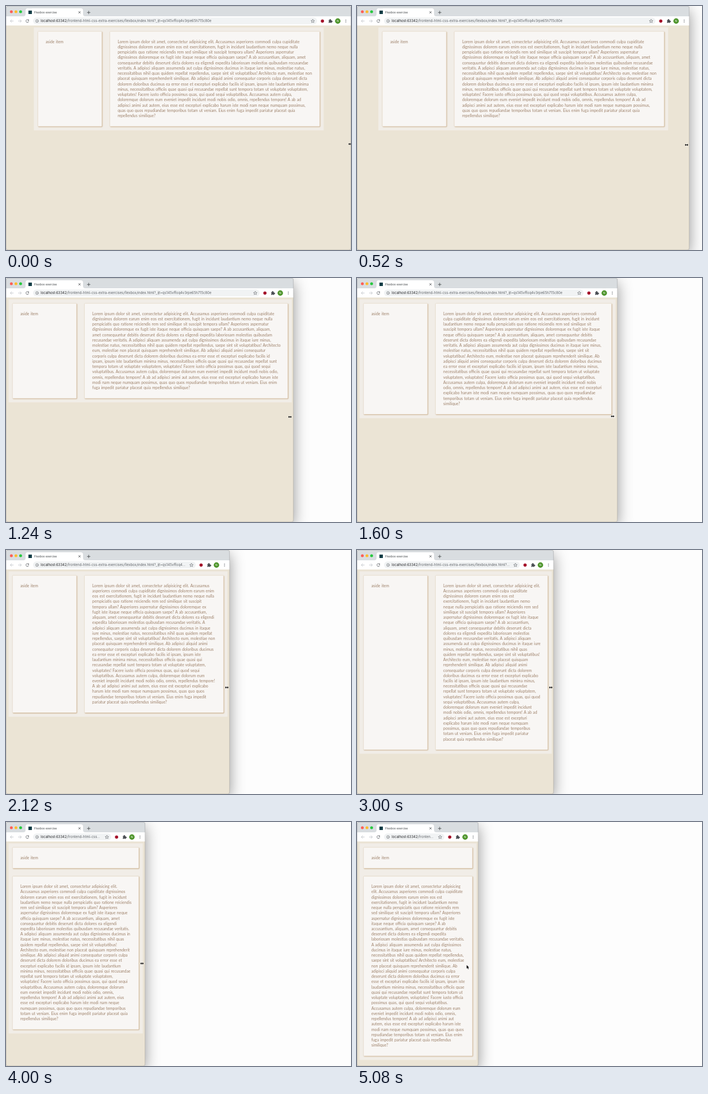
An HTML page for the animation above (5280 ms loop, 600 px wide and 426 px high).

```html
<!DOCTYPE html>
<html lang="en">
<head>
<meta charset="utf-8">
<title>Flexbox exercise</title>
<style>
  html, body { margin: 0; width: 100%; height: 100%; overflow: hidden; background: #fdfdfd; }
  #stage { position: relative; width: 600px; height: 426px; overflow: hidden; background: #fdfdfd; }
  #stage svg { position: absolute; display: block; overflow: visible; }
  #window {
    position: absolute; left: 0; top: 0; height: 426px; border-radius: 4px;
    box-shadow: 0 8px 26px rgba(0, 0, 0, .42), 0 0 1px rgba(0, 0, 0, .3);
  }
  #frame { position: absolute; inset: 0; overflow: hidden; border-radius: 4px; background: #ebe4d5; }
  #edge { position: absolute; inset: 0; border-radius: 4px; box-shadow: inset 0 0 0 .6px rgba(90, 90, 90, .35); }
  #tabs { position: absolute; left: 0; right: 0; top: 0; height: 18px; background: #d9dde0; }
  #bar { position: absolute; left: 0; right: 0; top: 18px; height: 16px; background: #fff; }
  #pill { position: absolute; left: 47px; right: 59px; top: 20.4px; height: 11.4px; border-radius: 6px; background: #f1f3f4; }
  .ui { position: absolute; font-family: Inter, Roboto, sans-serif; white-space: nowrap; overflow: hidden; }
  #title { left: 49px; top: 7px; font-size: 5px; line-height: 8px; color: #3c4043; }
  #url { left: 60.3px; right: 76px; top: 21px; font-size: 5.9px; line-height: 10px; color: #5f6368; text-overflow: ellipsis; }
  #url b { font-weight: 400; color: #202124; }

  /* The page is laid out in its own CSS pixels and shown at 42 %. */
  #page {
    position: absolute; left: .6px; top: 34px; transform: scale(.42); transform-origin: 0 0;
    font: 16.2px/22px Lato, "Open Sans", sans-serif; word-spacing: 1.25px; color: #9d8069;
  }
  #container { box-sizing: border-box; max-width: 1200px; margin: 8px auto; padding: 16px; background: #f1ede7; display: flex; gap: 32px; }
  .stacked #container { flex-direction: column; }
  .card {
    box-sizing: border-box; padding: 32px; background: #f8f6f4;
    border: 1px solid #dccbb3; border-radius: 3px; box-shadow: 2px 2px 4px #cab08e;
  }
  .card p { margin: 0; position: relative; top: -1.3px; white-space: pre; }
  #aside { flex: none; width: 266px; }
  #main { flex: 1; min-width: 0; }
  .stacked #aside, .stacked #main { flex: none; width: 100%; }
</style>
</head>
<body>
<div id="stage">
  <div id="window">
    <div id="frame">
      <div id="tabs"></div>
      <div id="bar"></div>
      <div id="pill"></div>
      <svg width="200" height="34" fill="none" stroke-linecap="round">
        <circle cx="9.3" cy="10" r="2.5" fill="#fe5f57"/>
        <circle cx="17.3" cy="10" r="2.5" fill="#febc2e"/>
        <circle cx="25.4" cy="10" r="2.5" fill="#28c840"/>
        <path d="M30 18q4 0 4-4V8q0-4 4-4H130q4 0 4 4v6q0 4 4 4Z" fill="#fff"/>
        <rect x="39" y="8" width="6" height="6" fill="#123d46"/>
        <path d="M126.3 9.6l3 3m0-3l-3 3M141.3 11.3h5m-2.5-2.5v5" stroke="#3c4043" stroke-width=".8"/>
        <path d="M12.8 26.2H7.6m2.3-2.4l-2.4 2.4 2.4 2.4M21.4 26.2h5.2m-2.3-2.4l2.4 2.4-2.4 2.4" stroke="#bdc1c6" stroke-width=".8"/>
        <path d="M39.2 24.7a2.5 2.5 0 1 0 .3 2.4" stroke="#50545a" stroke-width=".8"/>
        <path d="M39.8 23.3v2.2h-2.2z" fill="#50545a"/>
        <circle cx="54" cy="26.2" r="2.5" stroke="#5f6368" stroke-width=".6"/>
        <path d="M54 26v1.4M54 24.9v.1" stroke="#5f6368" stroke-width=".7"/>
      </svg>
      <div id="title" class="ui">Flexbox exercise</div>
      <div id="url" class="ui"><b>localhost:63342</b>/frontend-html-css-extra-exercises/flexbox/index.html?_ijt=qs145vffoq4v3rpe65h715c80e</div>
      <svg style="right:0" width="70" height="34">
        <path d="M3.5 23.2l.9 2 2.1.2-1.6 1.4.5 2.1-1.9-1.1-1.9 1.1.5-2.1-1.6-1.4 2.1-.2z" fill="none" stroke="#50545a" stroke-width=".6"/>
        <circle cx="20.3" cy="26.2" r="2.8" fill="#a5132b"/>
        <path d="M31.2 24.4h1.6a1.1 1.1 0 1 1 2 0h1.5v1.6a1.1 1.1 0 1 1 0 2v1.4h-1.7a1 1 0 0 0-1.9 0h-1.5v-1.7a1 1 0 0 0 0-1.8z" fill="#4a4e53"/>
        <circle cx="47" cy="26.2" r="4.7" fill="#4b9328"/>
        <text x="47" y="27.9" text-anchor="middle" font-family="Roboto, sans-serif" font-size="4.8" fill="#fff">N</text>
        <g fill="#50545a"><circle cx="61" cy="24.1" r=".65"/><circle cx="61" cy="26.2" r=".65"/><circle cx="61" cy="28.3" r=".65"/></g>
      </svg>
      <div id="page">
        <div style="display:flow-root;padding:0 8px">
          <div id="container">
            <div id="aside" class="card"><p>aside item</p></div>
            <div id="main" class="card"><p id="lorem"></p></div>
          </div>
        </div>
      </div>
    </div>
    <div id="edge"></div>
  </div>
  <svg width="600" height="426" stroke="#fff" stroke-width=".5" fill="#000" paint-order="stroke">
    <path id="resize" d="M-3 0l2-2v1.4h2V-2l2 2-2 2V.6h-2V2z"/>
    <path id="arrow" d="M190.7 249.7v6.2l1.4-1.3 1 2.4 1-.4-1-2.3h1.9z"/>
  </svg>
</div>
<script>
const LOOP = 5280, STEP = 40, SCALE = .42, BREAKPOINT = 768;
const $ = id => document.getElementById(id);

const words = `Lorem ipsum dolor sit amet, consectetur adipisicing elit. Accusamus asperiores commodi culpa cupiditate
dignissimos dolorem earum enim eos est exercitationem, fugit in incidunt laudantium nemo neque nulla
perspiciatis quo ratione reiciendis rem sed similique sit suscipit tempora ullam? Asperiores aspernatur
dignissimos doloremque ex fugit iste itaque neque officia quisquam saepe? A ab accusantium, aliquam, amet
consequuntur debitis deserunt dicta dolores ea eligendi expedita laboriosam molestias quibusdam recusandae
veritatis. A adipisci aliquam assumenda aut culpa dignissimos ducimus in itaque iure minus, molestiae natus,
necessitatibus nihil quas quidem repellat repellendus, saepe sint sit voluptatibus! Architecto eum, molestiae non
placeat quisquam reprehenderit similique. Ab adipisci aliquid animi consequatur corporis culpa deserunt dicta
dolorem doloribus ducimus ea error esse et excepturi explicabo facilis id ipsam, ipsum iste laudantium minima
minus, necessitatibus officiis quae quasi qui recusandae repellat sunt tempora totam ut voluptate voluptatem,
voluptates! Facere iusto officia possimus quas, qui quod sequi voluptatibus. Accusamus autem culpa,
doloremque dolorum eum eveniet impedit incidunt modi nobis odio, omnis, repellendus tempore! A ab ad
adipisci animi aut autem, eius esse est excepturi explicabo harum iste modi nam neque numquam possimus,
quas quo quos repudiandae temporibus totam ut veniam. Eius enim fuga impedit pariatur placeat quia
repellendus similique?`.split(/\s+/);

// Advance widths of a geometric sans, in thousandths of an em, used for line breaking.
const EM = 15.83 / 1000, SPACE = 278;
const advances = {
  ijl: 241, '.,!': 278, f: 315, t: 333, r: 352, s: 426, 'L?': 463, vy: 481, ckx: 500, a: 519,
  F: 537, hnuE: 556, e: 574, bdgopq: 611, A: 704, m: 852
};
const advance = {};
for (const [chars, width] of Object.entries(advances))
  for (const c of chars) advance[c] = width;
const wordWidths = words.map(word => [...word].reduce((sum, c) => sum + advance[c], 0));

function wrap(width) {
  const limit = width / EM, lines = [];
  let used = Infinity;
  words.forEach((word, i) => {
    if (used + SPACE + wordWidths[i] > limit) {
      lines.push(word);
      used = wordWidths[i];
    } else {
      lines[lines.length - 1] += ' ' + word;
      used += SPACE + wordWidths[i];
    }
  });
  return lines.join('\n');
}

// Linear interpolation through [time, value] points.
function track(points, t) {
  const next = points.findIndex(p => p[0] > t);
  if (next < 0) return points[points.length - 1][1];
  const [t0, a] = points[next - 1], [t1, b] = points[next];
  return a + (b - a) * (t - t0) / (t1 - t0);
}

const windowWidth = [[0, 600], [160, 600], [720, 565], [880, 549], [1280, 495], [1600, 453], [1840, 419],
  [2120, 389], [2240, 380], [2360, 380], [2920, 344.5], [3000, 342.3], [3480, 289], [4000, 241.5], [4280, 218], [4440, 211]];
const cursorX = [[0, 598.5], [160, 598.5], [720, 559], [880, 543], [1600, 444.5], [1840, 412], [2120, 384], [2240, 375],
  [2360, 375], [2920, 339.5], [3000, 337], [3480, 284], [4000, 236.5], [4280, 212], [4600, 197], [4760, 192]];
const cursorY = [[0, 241], [880, 243.5], [1600, 241.5], [2120, 240], [3000, 240], [4000, 247], [4600, 251.5]];

let shown = '';
function draw(time) {
  const t = Math.floor(time % LOOP / STEP) * STEP;
  const width = track(windowWidth, t);
  const pageWidth = (width - 1.2) / SCALE;
  const stacked = width / SCALE < BREAKPOINT;
  const inner = Math.min(1200, pageWidth - 16) - 32;

  $('window').style.width = width + 'px';
  $('page').style.width = pageWidth + 'px';
  $('page').className = stacked ? 'stacked' : '';
  const text = wrap(inner - 66 - (stacked ? 0 : 298));
  if (text !== shown) $('lorem').textContent = shown = text;

  const released = t >= 5080;
  $('resize').setAttribute('transform', `translate(${track(cursorX, t)} ${track(cursorY, t)})`);
  $('resize').style.display = released ? 'none' : '';
  $('arrow').style.display = released ? '' : 'none';
}

const start = performance.now();
function tick() {
  draw(performance.now() - start);
  requestAnimationFrame(tick);
}
tick();
</script>
</body>
</html>
```
